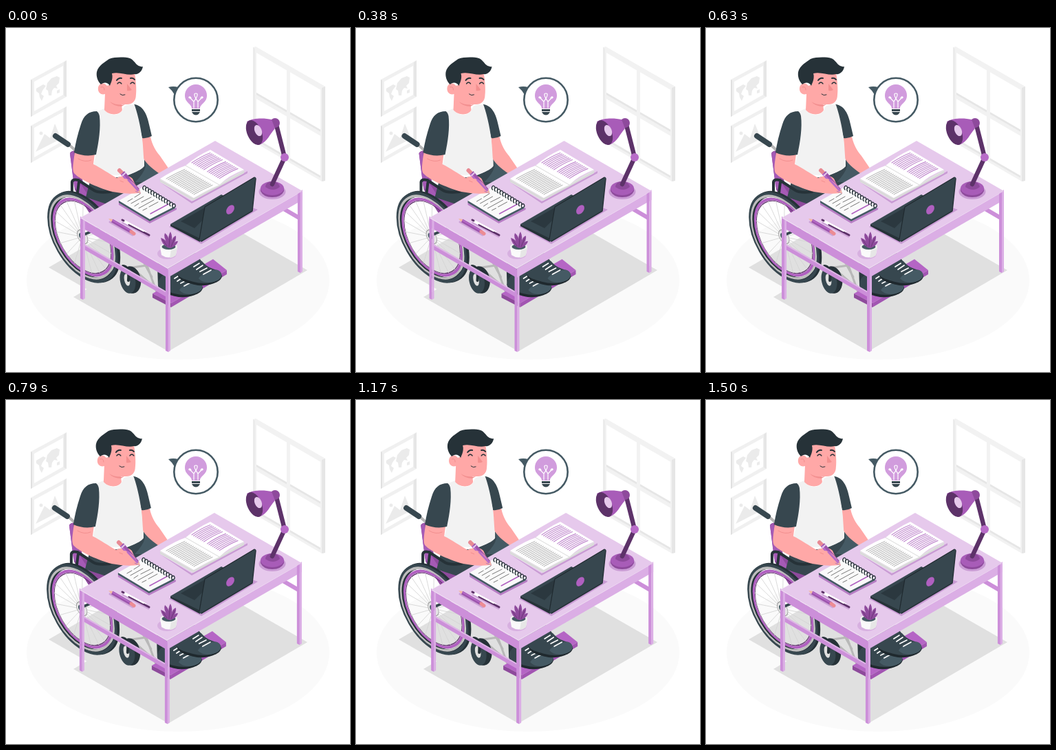
An HTML page for the animation above (1540 ms loop, 500 by 500 pixels).

```html
<!DOCTYPE html>
<html lang="en">
<head>
<meta charset="utf-8">
<title>Studying at the desk</title>
<style>
  html, body { margin: 0; width: 100%; height: 100%; overflow: hidden; background: #fff; }
  svg { display: block; width: 100vw; height: 100vh; }
  .line { fill: none; stroke-linecap: round; stroke-linejoin: round; }
</style>
</head>
<body>
<svg viewBox="0 0 500 500">
  <ellipse cx="250" cy="367" rx="220" ry="115" fill="#fafafa"/>
  <g fill="#e0e0e0">
    <path d="M62 348 140 303 210 344 132 388Z"/>
    <path d="M98 391 300 273 438 352 236 470Z"/>
  </g>

  <g id="pictures">
    <g id="frame">
      <path d="M36 75 88 47V100L36 129Z" fill="#f0f0f0"/>
      <path d="M36 75 38 76V128L36 129Z" fill="#e0e0e0"/>
      <path d="M84 50 88 47V100L84 98Z" fill="#e6e6e6"/>
      <path d="M41 78 83 55V97L41 121Z" fill="#fff"/>
    </g>
    <use href="#frame" y="67"/>
    <g fill="#ebebeb">
      <path d="M44 88 54 82 58 84 53 91 51 96 55 99 52 106 49 101 48 95 44 92Z"/>
      <path d="M60 80 66 73 74 70 78 72 77 80 73 84 75 88 70 87 67 91 66 98 62 98 61 91 58 89Z"/>
      <path d="M74 91 78 89 78 94 74 95Z"/>
      <path d="M43 180 56 154 64 160 71 139 80 161Z"/>
      <circle cx="51" cy="153" r="2.5"/>
    </g>
  </g>

  <g id="window">
    <path d="M359 28 363 27 464 85V222L459 223 359 165Z" fill="#f2f2f2"/>
    <path d="M459 87 464 85V222L459 223Z" fill="#e6e6e6"/>
    <path d="M359 28 362 30V167L359 165Z" fill="#ebebeb"/>
  </g>

  <g id="bubble">
    <path d="M236 86Q243 84 250 86L245 97Q241 90 236 86Z" fill="#455a64"/>
    <circle cx="276" cy="104.500" r="31.700" fill="#fff" stroke="#455a64" stroke-width="2.600"/>
    <path d="M270 117C270 110 260 109 260 98A16 16 0 0 1 292 98C292 109 282 110 282 117Z" fill="#d19cdd"/>
    <path class="line" d="M273 116V107L267 101M279 116V107L285 101M273 107C278 100 280 95 276 95S274 100 279 107M267 102C264 101 268 98 269 102M285 102C288 101 284 98 283 102" stroke="#fff" stroke-width="1.200"/>
    <path d="M270 118H282V121H270ZM270 122H282L280 125Q276 128 272 125Z" fill="#37474f"/>
  </g>

  <g id="desk">
    <g id="chair">
      <path class="line" d="M91 169 101 178" stroke="#b5b5b5" stroke-width="4"/>
      <path class="line" d="M72 157 90 169" stroke="#37474f" stroke-width="8"/>
      <path d="M93 182Q95 177 104 179L112 225 160 248V275H125L100 235Z" fill="#8e4a9c"/>
      <path d="M93 182 98 179 107 224 132 262 122 262 99 230Z" fill="#a55ab5"/>
      <path class="line" d="M170 350 205 345 222 392M200 340 212 362M186 351 210 372" stroke="#b8b8b8" stroke-width="3"/>
      <path d="M213 386 301 336 321 352 240 400Z" fill="#b565c5"/>
      <path d="M213 386 240 400V406L213 392Z" fill="#8e4a9c"/>
      <path d="M240 400 321 352V358L240 406Z" fill="#a255b2"/>
      <ellipse cx="182" cy="366" rx="14" ry="20" fill="#263238" transform="rotate(-12 182 366)"/>
      <ellipse cx="177" cy="367" rx="11" ry="19" fill="#37474f" transform="rotate(-12 177 367)"/>
      <ellipse cx="176" cy="366" rx="4" ry="9" fill="#e0e0e0" transform="rotate(-12 176 366)"/>
      <path class="line" d="M170 346Q180 346 178 367" stroke="#263238" stroke-width="4"/>
    </g>

    <g id="feet">
      <path d="M220 342 270 320 285 340 262 352 242 376 221 374Z" fill="#2b383f"/>
      <g id="shoe">
        <path d="M221 373C222 384 234 387 246 390C260 394 286 388 286 377L280 370 240 366Z" fill="#1f292e"/>
        <path d="M221 372C222 362 230 356 244 351L257 356C263 363 270 367 280 369C286 372 288 378 281 383C270 389 256 389 245 386C234 383 221 380 221 372Z" fill="#37474f"/>
        <path d="M252 381C257 373 270 368 280 369C286 372 288 378 281 383C270 389 258 388 252 381Z" fill="#455a64"/>
        <path class="line" d="M245 364 253 359M249 368 258 362M254 371 264 366M259 375 270 369" stroke="#fff" stroke-width="1.700"/>
      </g>
      <use href="#shoe" x="28" y="-17"/>
    </g>

    <g id="body">
      <path d="M201 191C212 196 222 205 227 213L165 262 116 246 125 212C160 225 190 212 201 200Z" fill="#37474f"/>
      <path d="M201 191C212 196 222 205 227 213L208 224 188 224Q200 212 203 201Z" fill="#455a64"/>
      <path d="M198 160 210 158C213 171 218 179 224 186L239 208 222 211C212 204 203 196 199 188Z" fill="#ffa8a7"/>
      <path d="M187 111C199 113 205 125 208 140L212 157Q205 161 198 160C195 145 190 130 185 113Z" fill="#37474f"/>
      <path d="M131 122 143 117C147 128 165 130 170 118C171 113 176 110 187 112C193 130 197 150 199 170L201 201C190 214 150 221 126 203C130 190 135 170 135 150Z" fill="#f2f2f2"/>
      <path d="M153 64 187 65C189 76 190 90 189 97C189 107 183 111 176 111H168L169 119C166 127 150 128 143 119L144 96C138 98 133 93 134 87C135 80 142 78 147 84L152 82Z" fill="#ffa8a7"/>
      <path d="M151 107Q160 113 173 111L168 114Q157 114 151 107Z" fill="#f28f8f"/>
      <path d="M138 82C133 77 131 70 132 64C134 54 145 49 150 45C158 42 173 42 180 44C185 46 187 50 190 53Q194 57 199 56C198 64 191 68 187 67C177 70 165 63 154 66C156 73 153 79 151 84C147 78 142 79 138 82Z" fill="#263238"/>
      <g class="line" stroke="#263238" stroke-width="1.300">
        <path d="M162 81Q165 77 168 81M181 81Q184 77 187 81"/>
        <path d="M161 76Q164 72 168 73M181 73Q185 72 187 75" stroke-width="2"/>
        <path d="M166 96Q169 99 173 97" stroke-width="1"/>
      </g>
      <path d="M176 81 183 90Q179 92 176 91Z" fill="#f28f8f"/>
      <path class="line" d="M138 86Q143 84 143 90" stroke="#f28f8f"/>
    </g>

    <g id="wheel">
      <path class="line" d="M96 238V224Q97 219 105 221L128 236Q134 240 152 238M104 240 106 224M120 250 132 262" stroke="#263238" stroke-width="4"/>
      <g class="line" transform="matrix(.866 .5 0 1 113 304.500)">
        <circle r="56" cx="2" cy="-2" stroke="#263238" stroke-width="7"/>
        <circle r="57" cx="-2" cy="1" stroke="#37474f" stroke-width="4"/>
        <circle r="53.500" cx="-3" cy="1" stroke="#bdbdbd" stroke-width="3"/>
        <circle r="49.500" cx="-1" stroke="#b060c0" stroke-width="3.500"/>
        <circle r="47" cx="-1" stroke="#5d3269" stroke-width="1"/>
        <g id="spokes" stroke="#d4d4d4" stroke-width=".8"></g>
        <circle r="9" cx="-2" fill="#e6e6e6" stroke="#9e9e9e"/>
        <circle r="4" cx="-4" fill="#455a64"/>
      </g>
      <path class="line" d="M114 300 150 285" stroke="#37474f" stroke-width="4"/>
    </g>

    <g id="table">
      <path d="M403 259 427 273V280L403 266Z" fill="#cc8fd9"/>
      <path d="M112 313 235 384V392L112 321Z" fill="#cc8fd9"/>
      <path d="M112 313 235 384V386L112 315Z" fill="#dfb9e7"/>
      <path d="M108 276 235 350V363L108 289Z" fill="#cc8fd9"/>
      <path d="M235 350 431 237V250L235 363Z" fill="#dbaee5"/>
      <g id="leg">
        <path d="M232 350 236 352V471L232 469Z" fill="#cc8fd9"/>
        <path d="M236 352 239 350V469L236 471Z" fill="#dbaee5"/>
      </g>
      <use href="#leg" x="-124" y="-76"/>
      <use href="#leg" x="192" y="-115"/>
      <path d="M108 276 304 164 431 237 235 350Z" fill="#e6c9ec"/>
      <path d="M108 276 110 276 235 348.500 431 237 235 350Z" fill="#efdcf3"/>
    </g>

    <g id="notebook">
      <path d="M164 254 209 281 248 261V264L209 284 164 257Z" fill="#b77cc4"/>
      <path d="M164 251 201 230 246 259 209 278Z" fill="#fafafa"/>
      <path d="M164 251 209 278 246 259V262L209 281 164 254Z" fill="#455a64"/>
      <path class="line" d="M177 252 184 248M187 246 195 241M182 255 200 245M187 259 193 255M197 253 211 246M193 262 215 250M199 265 205 262M208 260 221 253" stroke="#777" stroke-width="1"/>
      <path class="line" d="M210 270 236 256" stroke="#b060c0" stroke-width="1.500"/>
      <g id="spiral" class="line" stroke="#263238" stroke-width="1.300"></g>
    </g>

    <g id="arm">
      <path d="M100 181C98 195 96 206 99 211C109 222 139 234 155 238Q175 242 192 240Q196 237 190 232L184 219C177 212 168 215 161 218C150 212 138 203 127 198L129 183Z" fill="#ffa8a7"/>
      <path d="M132 121C120 121 113 127 109 140C104 155 101 168 99 181Q115 188 131 184C135 165 138 145 136 128Q135 123 132 121Z" fill="#37474f"/>
      <path class="line" d="M105 190Q115 196 124 192M166 222Q176 225 183 234" stroke="#f28f8f" stroke-width="1"/>
      <path class="line" d="M165 207 168 210" stroke="#e88a94" stroke-width="6"/>
      <path d="M167 213 172 208 194 234 196 241 189 238Z" fill="#9d54ad"/>
      <path d="M167 213 169 211 191 236 189 238Z" fill="#b86cc8"/>
      <path d="M189 237 194 234 196 241Z" fill="#f4b9a5"/>
      <path d="M169 215 174 210" stroke="#e5c8ea" stroke-width="2"/>
      <path d="M171 219Q181 218 190 231 194 236 189 237 178 235 171 226Z" fill="#ffa8a7"/>
      <path class="line" d="M178 221 192 236" stroke="#b86cc8" stroke-width="3"/>
    </g>
  </g>

  <g id="book">
    <path d="M222 223 270 252 351 208V211L270 255Z" fill="#c99bd4"/>
    <path d="M224 219 273 247 346 206V211L272 251 224 224Z" fill="#e0e0e0"/>
    <path d="M224 219Q246 205 261 200 277 186 297 177L346 206Q324 214 310 228 293 235 273 247Z" fill="#fff"/>
    <path class="line" d="M261 200 310 228M224 222 272 249 310 230 346 209" stroke="#d0d0d0" stroke-width=".8"/>
    <g id="text" class="line"></g>
  </g>

  <g id="laptop">
    <path d="M237 289 314 245 366 264 284 314Z" fill="#c99bd4"/>
    <path d="M239 285 313 242 358 266 282 308Z" fill="#37474f"/>
    <path d="M239 285 282 306V311L239 288Z" fill="#263238"/>
    <path d="M254 281 289 261 286 279 274 291Z" fill="#2b383f"/>
    <path d="M289 260 361 217Q364 216 363 220L358 266 284 310Q281 311 281 307Z" fill="#37474f"/>
    <path class="line" d="M281 307 289 260 361 217" stroke="#1f292e" stroke-width="1.200"/>
    <path class="line" d="M284 310 358 266 363 219" stroke="#263238" stroke-width="1.500"/>
    <ellipse cx="326" cy="264" rx="5" ry="7.500" fill="#b060c0" transform="rotate(35 326 264)"/>
  </g>

  <g id="pens" class="line">
    <path d="M151 282 184 301M170 283 207 303" stroke="#cda3d7" stroke-width="3"/>
    <path d="M154 280 182 296" stroke="#9d54ad" stroke-width="5" stroke-linecap="butt"/>
    <path d="M154 279 182 295" stroke="#b86cc8" stroke-width="1.500"/>
    <path d="M182 296 186 299" stroke="#ec8c94" stroke-width="5"/>
    <path d="M149 277 155 278 153 282Z" fill="#f4b9a5"/>
    <path d="M172 281 202 297" stroke="#fff" stroke-width="4"/>
    <path d="M169 279 171 280M179 286 208 301" stroke="#5d3269" stroke-width="3"/>
    <path d="M179 284 200 295" stroke="#fff" stroke-width="2"/>
  </g>

  <g id="plant">
    <ellipse cx="234" cy="328" rx="14" ry="8" fill="#d7b0e0"/>
    <path d="M224 318 226 330Q236 337 247 330L249 318Z" fill="#fafafa"/>
    <path d="M240 322 249 318 247 330Q243 334 238 334Z" fill="#e6e6e6"/>
    <ellipse cx="236.500" cy="318" rx="12.500" ry="5.500" fill="#f0f0f0"/>
    <ellipse cx="236.500" cy="318" rx="10" ry="4" fill="#455a64"/>
    <path d="M235 319Q226 314 225 305 232 307 235 313 228 304 231 298 237 303 237 311 235 302 239 296 243 304 240 312 242 303 247 302 248 309 243 314 247 309 250 310 248 317 239 320Z" fill="#8e4a9c"/>
    <path class="line" d="M237 318 238 303M234 317 228 308M240 318 245 306" stroke="#6d3679" stroke-width="1"/>
  </g>

  <g id="lamp">
    <ellipse cx="387" cy="238" rx="19.500" ry="11" fill="#c99bd4"/>
    <path d="M370 233V237Q374 246 387 246T404 237V233Z" fill="#8e4a9c"/>
    <ellipse cx="387" cy="233" rx="17" ry="10" fill="#a85cb8"/>
    <path d="M377 231Q378 223 387 223T398 231Q388 239 377 231Z" fill="#8e4a9c"/>
    <path class="line" d="M387 227 405 188 393 141" stroke="#5d3269" stroke-width="6.500"/>
    <circle cx="405" cy="188" r="6" fill="#b86cc8"/>
    <circle cx="391" cy="138" r="7" fill="#8e4a9c"/>
    <path d="M350 136C360 130 377 131 386 133L391 146C384 153 380 166 368 170Z" fill="#a85cb8"/>
    <ellipse cx="361" cy="152" rx="10.500" ry="19" fill="#5d3269" transform="rotate(-23 361 152)"/>
    <ellipse cx="366.500" cy="149" rx="5" ry="8.500" fill="#e6c9ec" transform="rotate(-23 366.500 149)"/>
  </g>
</svg>
<script>
  const $ = id => document.getElementById(id);
  const draw = (id, d, attrs = '') =>
    $(id).insertAdjacentHTML('beforeend', `<path d="${d}" ${attrs}/>`);

  // Window panes, sheared along the wall
  for (const x of [364, 413])
    for (const row of [0, 1]) {
      const y = 36 + (x - 364) * 0.577 + row * 67;
      draw('window', `M${x} ${y}l44 25.400v58l-44-25.400z`, 'fill="#fff"');
      draw('window', `M${x} ${y + 58}l44 25.400v3l-44-25.400z`, 'fill="#e6e6e6"');
    }

  for (let i = 0; i < 20; i++) {
    const a = i * Math.PI / 10;
    draw('spokes', `M-2 0L${47 * Math.cos(a) - 1} ${47 * Math.sin(a)}`);
  }

  for (let i = 0; i < 12; i++)
    draw('spiral', `M${200 + i * 3.900} ${235 + i * 2.380}c-3-3 1-8 3-4.500q1 2 0 3`);

  for (let i = 0; i < 17; i++) {
    const x = i * 2.500, y = i * 1.430;
    draw('text', `M${233 + x} ${219 + y}q14-8 27-13.500`, 'stroke="#9a9a9a" stroke-width=".8"');
    if (i !== 8)
      draw('text', `M${270 + x} ${196 + y}q13-9 27-14.500`, 'stroke="#c18ace" stroke-width="1.100"');
  }

  // Horizontal shake: one offset per tenth of the cycle
  const LOOP = 1540, STEPS = 37;
  const shake = [0, -1, 2, -4, 4, -4, 4, -4, 2, -1, 0];

  function tick(now) {
    const step = Math.floor((now % LOOP) / LOOP * STEPS);
    const pos = (step / 36 + 0.008) % 1 * 10;
    const i = Math.floor(pos);
    const x = shake[i] + (shake[i + 1] - shake[i]) * (pos - i);
    $('desk').setAttribute('transform', `translate(${x} 0)`);
    requestAnimationFrame(tick);
  }
  tick(0);
</script>
</body>
</html>
```
